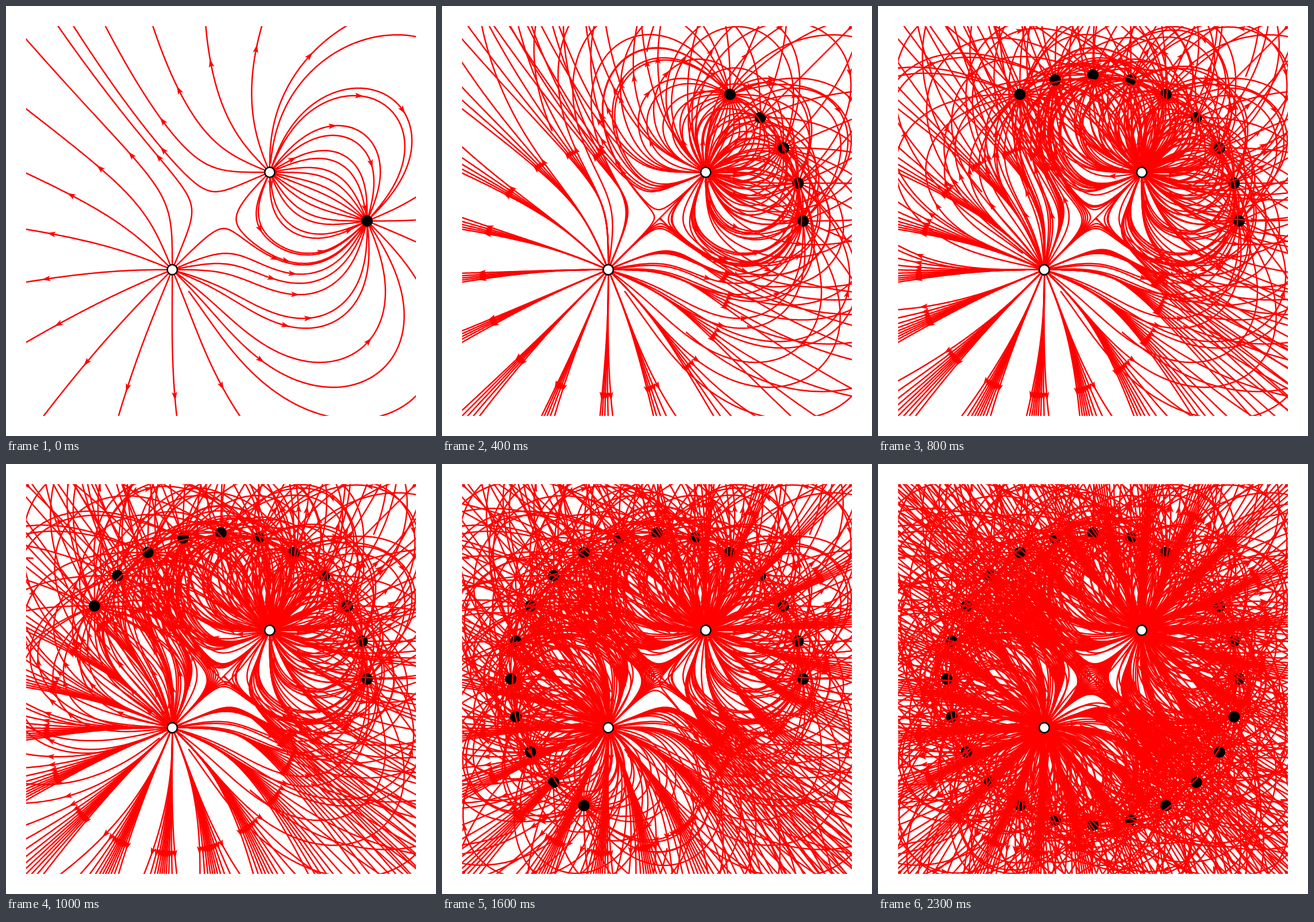
These frames come from a looping animation (748 by 748 pixels, 2400 ms). An HTML page with a canvas:

```html
<!DOCTYPE html>
<html lang="en">
<head>
<meta charset="utf-8">
<title>Field lines of three charges</title>
<style>
  html, body { margin: 0; width: 100%; height: 100%; overflow: hidden; background: #fff; }
  canvas { display: block; }
</style>
</head>
<body>
<canvas id="stage" width="748" height="748"></canvas>
<script>
const ctx = document.getElementById('stage').getContext('2d');

const SIZE = 748, MARGIN = 35, UNIT = 169.5;
const STEPS = 24, STEP_MS = 100;
const LINES = 16, SEED_RADIUS = 0.02, DS = 0.02, MAX_LENGTH = 5;
const ARROW_AT = 1.3, ARROW_LENGTH = 15;
const SOURCES = [{ x: 0.5, y: 0.5, q: 1 }, { x: -0.5, y: -0.5, q: 1 }];

const px = x => SIZE / 2 + UNIT * x;
const py = y => SIZE / 2 - UNIT * y;

function sinkAt(step) {
  const angle = 2 * Math.PI * step / STEPS;
  return { x: 1.5 * Math.cos(angle), y: 1.5 * Math.sin(angle), q: -1 };
}

// Unit vector of the Coulomb field, reversed for sign = -1.
function direction(charges, x, y, sign) {
  let ex = 0, ey = 0;
  for (const c of charges) {
    const dx = x - c.x, dy = y - c.y;
    const k = c.q / Math.pow(dx * dx + dy * dy, 1.5);
    ex += k * dx;
    ey += k * dy;
  }
  const n = sign / Math.hypot(ex, ey);
  return [ex * n, ey * n];
}

function rungeKutta(charges, [x, y], sign) {
  const h = DS / 2;
  const a = direction(charges, x, y, sign);
  const b = direction(charges, x + h * a[0], y + h * a[1], sign);
  const c = direction(charges, x + h * b[0], y + h * b[1], sign);
  const d = direction(charges, x + DS * c[0], y + DS * c[1], sign);
  const mix = i => DS / 6 * (a[i] + 2 * b[i] + 2 * c[i] + d[i]);
  return [x + mix(0), y + mix(1)];
}

function trace(charges, seed, angle) {
  let p = [seed.x + SEED_RADIUS * Math.cos(angle), seed.y + SEED_RADIUS * Math.sin(angle)];
  const points = [[seed.x, seed.y], p];
  const ends = charges.filter(c => c.q !== seed.q);
  for (let s = SEED_RADIUS; s < MAX_LENGTH; s += DS) {
    p = rungeKutta(charges, p, seed.q);
    points.push(p);
    if (ends.some(c => Math.hypot(p[0] - c.x, p[1] - c.y) < 0.03)) break;
  }
  return points;
}

function addArrow(path, points, sign) {
  const i = Math.round(ARROW_AT / DS);
  if (i + 1 >= points.length) return;
  const [x, y] = points[i];
  const ux = sign * (points[i + 1][0] - points[i - 1][0]) / (2 * DS);
  const uy = -sign * (points[i + 1][1] - points[i - 1][1]) / (2 * DS);
  const corner = (along, across) => [
    px(x) + ARROW_LENGTH * (along * ux - across * uy),
    py(y) + ARROW_LENGTH * (along * uy + across * ux)
  ];
  path.moveTo(...corner(0.5, 0));
  path.lineTo(...corner(-0.5, 0.32));
  path.lineTo(...corner(-0.28, 0));
  path.lineTo(...corner(-0.5, -0.32));
  path.closePath();
}

function buildLayer(step) {
  const sink = sinkAt(step), charges = [...SOURCES, sink];
  const lines = new Path2D(), arrows = new Path2D();
  for (const seed of charges) {
    for (let i = 0; i < LINES; i++) {
      const points = trace(charges, seed, 2 * Math.PI * i / LINES);
      points.forEach(([x, y], k) => lines[k ? 'lineTo' : 'moveTo'](px(x), py(y)));
      addArrow(arrows, points, seed.q);
    }
  }
  return { lines, arrows, charges };
}

const layers = Array.from({ length: STEPS }, (_, step) => buildLayer(step));

function drawCharge({ x, y, q }) {
  ctx.beginPath();
  ctx.arc(px(x), py(y), 8.7, 0, 2 * Math.PI);
  ctx.fillStyle = q > 0 ? '#fff' : '#000';
  ctx.fill();
  ctx.strokeStyle = '#000';
  ctx.stroke();
}

function drawLayer({ lines, arrows, charges }) {
  ctx.lineWidth = 2.5;
  ctx.save();
  ctx.beginPath();
  ctx.rect(MARGIN, MARGIN, SIZE - 2 * MARGIN, SIZE - 2 * MARGIN);
  ctx.clip();
  ctx.strokeStyle = ctx.fillStyle = '#f00';
  ctx.stroke(lines);
  ctx.fill(arrows);
  ctx.restore();
  charges.forEach(drawCharge);
}

let shown = STEPS;

// Each step is laid over the earlier ones; the sheet is wiped on every loop.
function render(time) {
  const step = Math.floor(time / STEP_MS) % STEPS;
  if (step < shown) {
    ctx.fillStyle = '#fff';
    ctx.fillRect(0, 0, SIZE, SIZE);
    shown = -1;
  }
  while (shown < step) drawLayer(layers[++shown]);
}

const start = performance.now();
function tick() {
  render(performance.now() - start);
  requestAnimationFrame(tick);
}
tick();
</script>
</body>
</html>
```
